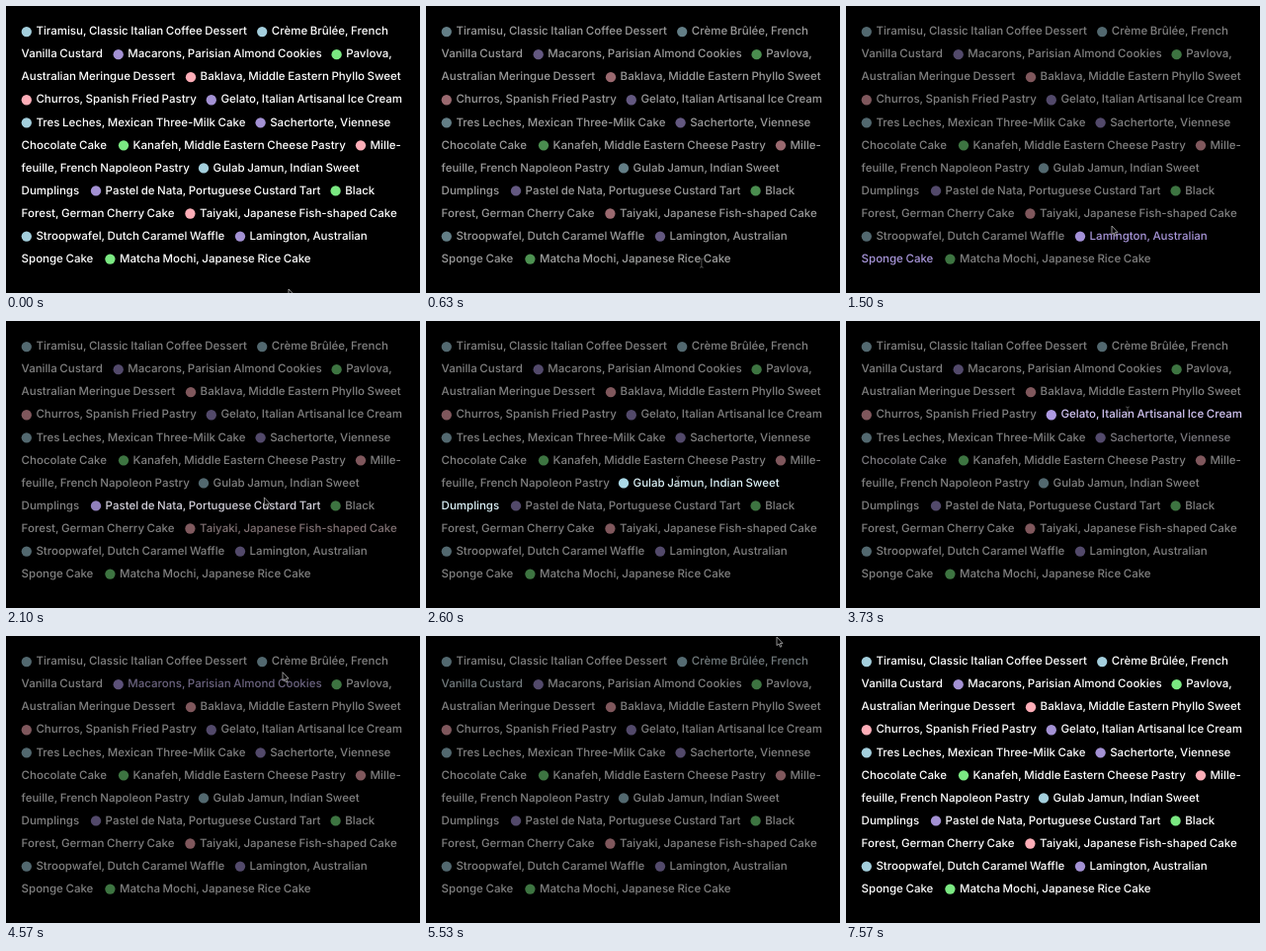
Write an HTML page that moves like this. It is 419 by 291 pixels and loops after 7610 ms.

```html
<!DOCTYPE html>
<html lang="en">
<head>
<meta charset="utf-8">
<title>Desserts</title>
<style>
  html, body { margin: 0; width: 100%; height: 100%; overflow: hidden; background: #000; }
  svg { display: block; width: 419px; height: 291px; cursor: default; }
  text {
    font: 450 11.5px Inter, "Open Sans", sans-serif;
    word-spacing: -.5px;
    text-rendering: geometricPrecision;
  }
</style>
</head>
<body>
<svg id="stage" viewBox="0 0 419 291"></svg>
<script>
const LOOP = 7610, PITCH = 23.05;
const stage = document.getElementById('stage');

// Resting dot colour and hover colour
const palette = {
  blue: [[164, 207, 221], [178, 226, 240]],
  purple: [[163, 145, 211], [181, 160, 238]],
  green: [[123, 232, 130], [144, 240, 148]],
  pink: [[253, 173, 183], [255, 184, 194]]
};

// Dot centre, line, colour, text ("|" marks a wrap)
const items = [
  [20.8, 0, 'blue', 'Tiramisu, Classic Italian Coffee Dessert'],
  [259.2, 0, 'blue', 'Crème Brûlée, French|Vanilla Custard'],
  [113.7, 1, 'purple', 'Macarons, Parisian Almond Cookies'],
  [334.6, 1, 'green', 'Pavlova,|Australian Meringue Dessert'],
  [187, 2, 'pink', 'Baklava, Middle Eastern Phyllo Sweet'],
  [20.8, 3, 'pink', 'Churros, Spanish Fried Pastry'],
  [207.8, 3, 'purple', 'Gelato, Italian Artisanal Ice Cream'],
  [20.8, 4, 'blue', 'Tres Leches, Mexican Three-Milk Cake'],
  [257.6, 4, 'purple', 'Sachertorte, Viennese|Chocolate Cake'],
  [119, 5, 'green', 'Kanafeh, Middle Eastern Cheese Pastry'],
  [359, 5, 'pink', 'Mille-|feuille, French Napoleon Pastry'],
  [200, 6, 'blue', 'Gulab Jamun, Indian Sweet|Dumplings'],
  [91, 7, 'purple', 'Pastel de Nata, Portuguese Custard Tart'],
  [333.6, 7, 'green', 'Black|Forest, German Cherry Cake'],
  [186.4, 8, 'pink', 'Taiyaki, Japanese Fish-shaped Cake'],
  [20.8, 9, 'blue', 'Stroopwafel, Dutch Caramel Waffle'],
  [237, 9, 'purple', 'Lamington, Australian|Sponge Cake'],
  [105.4, 10, 'green', 'Matcha Mochi, Japanese Rice Cake']
];

// Item, pointer enters, pointer leaves
const hovers = [
  [17, 600, 800], [16, 960, 1440], [14, 1640, 1800], [12, 1950, 2080],
  [11, 2320, 2780], [9, 2880, 3100], [8, 3180, 3280], [6, 3390, 3870],
  [4, 3900, 4030], [2, 4080, 4380], [1, 4750, 5180]
];
const LIST_IN = 350, LIST_OUT = 5540, POINTER_OUT = 5620;

// Pointer path as [time, value]; it rises through each hovered line
const pathX = [[0, 286], [1500, 269], [2600, 255], [3730, 285], [4570, 280], [5180, 318], [5530, 355], [5700, 372]];
const pathY = [[0, 287]];
for (const [i, enter, leave] of hovers) {
  const mid = 25.3 + PITCH * items[i][1];
  pathY.push([enter, mid + 7], [leave, mid - 7]);
}
pathY.push([5530, 1], [5700, -12]);

function add(parent, tag, attrs, content = '') {
  const el = document.createElementNS('http://www.w3.org/2000/svg', tag);
  for (const k in attrs) el.setAttribute(k, attrs[k]);
  el.textContent = content;
  return parent.appendChild(el);
}

function along(path, t) {
  let i = 1;
  while (i < path.length - 1 && path[i][0] < t) i++;
  const [[t0, a], [t1, b]] = [path[i - 1], path[i]];
  return a + (b - a) * Math.min(1, (t - t0) / (t1 - t0));
}

function ease(t, start, duration) {
  const p = Math.max(0, Math.min(1, (t - start) / duration));
  return p * p * (3 - 2 * p);
}

const pulse = (t, from, to, duration) => ease(t, from, duration) * (1 - ease(t, to, duration));
const mix = (a, b, p) => `rgb(${a.map((v, i) => Math.round(v + (b[i] - v) * p))})`;

const views = items.map(([x, line, color, label], i) => {
  const group = add(stage, 'g', {});
  const dot = add(group, 'circle', { cx: x, cy: 26.1 + PITCH * line, r: 5.15 });
  label.split('|').forEach((part, n) =>
    add(group, 'text', { x: n ? 15.6 : x + 9.6, y: 29.3 + PITCH * (line + n) }, part));
  return { group, dot, colors: palette[color], hover: hovers.find(h => h[0] === i) };
});

const arrow = add(stage, 'path', {
  d: 'M0 0V8.6L2 6.9 3.5 10.2 4.9 9.6 3.4 6.4H6Z', fill: '#000', stroke: '#ccc', 'stroke-width': .7
});
const beam = add(stage, 'path', {
  d: 'M-1.8-4.5Q0-4.5 0-3.5Q0-4.5 1.8-4.5M0-3.5V3.5M-1.8 4.5Q0 4.5 0 3.5Q0 4.5 1.8 4.5',
  fill: 'none', stroke: '#777', 'stroke-width': .7
});

function draw(now) {
  const t = now % LOOP;
  const dim = ease(t, LIST_IN, 400) * (1 - ease(t, LIST_OUT, 430));
  for (const { group, dot, colors: [rest, lit], hover } of views) {
    const glow = hover ? pulse(t, hover[1], hover[2], 220) : 0;
    const tint = hover ? pulse(t, hover[1], hover[2], 600) : 0;
    group.setAttribute('opacity', 1 - .5 * dim * (1 - glow));
    group.setAttribute('fill', mix([255, 255, 255], lit, tint));
    dot.setAttribute('fill', mix(rest, lit, tint));
  }
  const place = `translate(${along(pathX, t)} ${along(pathY, t)})`;
  const onText = hovers.some(h => t >= h[1] && t < h[2]);
  for (const [el, shown] of [[arrow, !onText], [beam, onText]]) {
    el.setAttribute('transform', place);
    el.setAttribute('visibility', shown && t < POINTER_OUT ? 'visible' : 'hidden');
  }
}

let start;
function frame(now) {
  start ??= now;
  draw(now - start);
  requestAnimationFrame(frame);
}
draw(0);
requestAnimationFrame(frame);
</script>
</body>
</html>
```
